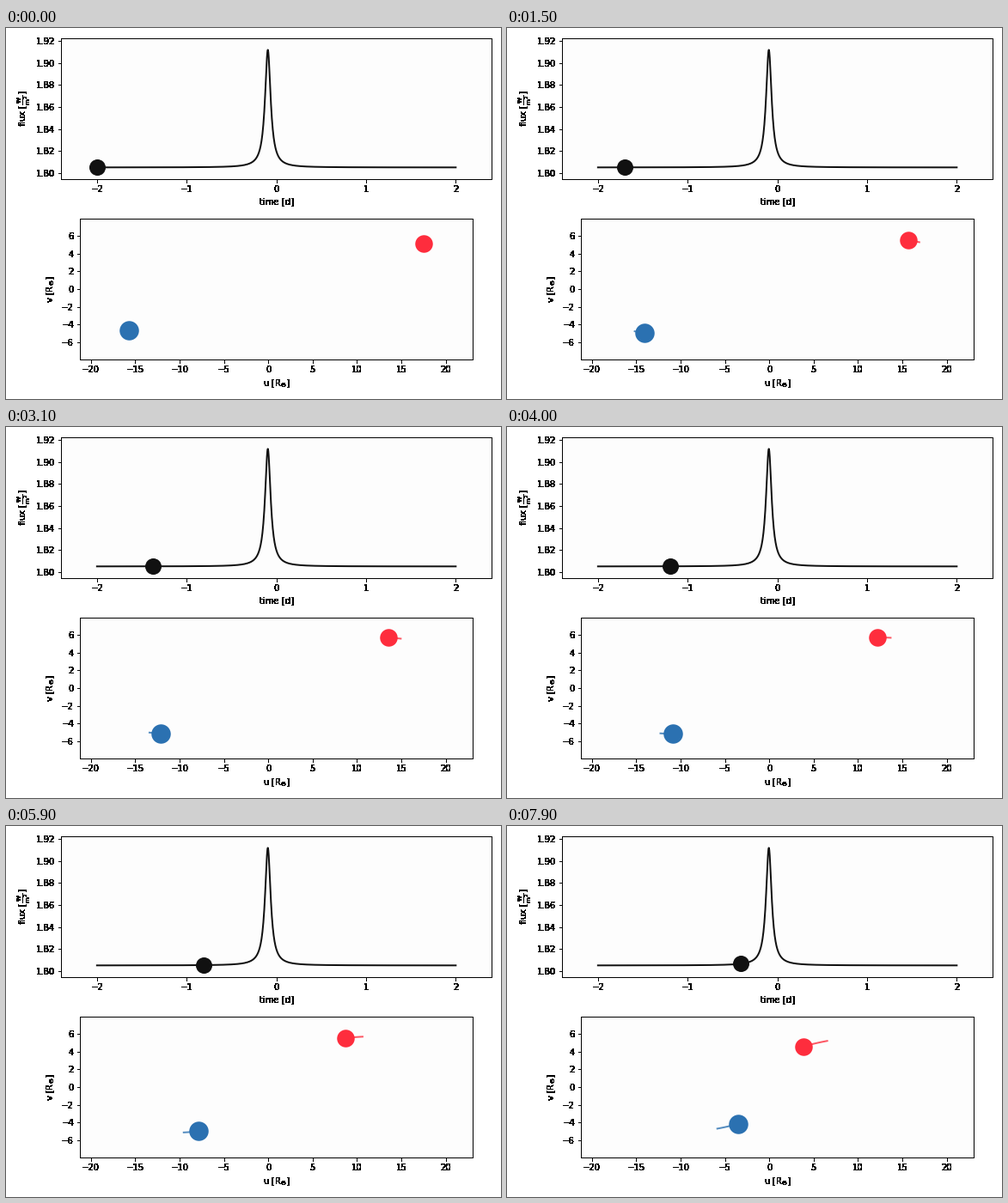
Recreate the animation shown at these times as a matplotlib script. Size 576 px wide and 432 px high, loop 8000 ms.

```python
import numpy as np
import matplotlib.pyplot as plt
from matplotlib.animation import FuncAnimation

W, H, DPI = 576, 432, 72
FRAMES, INTERVAL = 80, 100
STEP = 4 / 199              # days per frame
TRAIL = 0.2                 # trail length in days
PEAK = -0.095               # time of closest approach
BLACK, BLUE, RED = "#111111", "#2b71b1", "#fe2d3d"
RATIO = -0.897              # primary orbit relative to the secondary

plt.rcParams.update({"font.family": "DejaVu Sans", "font.size": 10})


def harden(img, dpi):
    """Make every partly covered pixel solid black."""
    out = np.zeros_like(img)
    out[..., 3] = img[..., 3] > 0.04
    return out, 0, 0


def panel(left, top, right, bottom, xlim, ylim, xticks, yticks, labels, pad):
    ax = fig.add_axes([left / W, 1 - bottom / H, (right - left) / W, (bottom - top) / H])
    ax.set(xlim=xlim, ylim=ylim, xticks=xticks, yticks=yticks,
           xlabel=labels[0], facecolor="#fdfdfd")
    ax.set_ylabel(labels[1], labelpad=pad)
    for part in (ax.xaxis, ax.yaxis, *ax.spines.values()):
        part.set_agg_filter(harden)
    return ax


def dot(ax, color, size):
    return ax.plot([], [], "o", color=color, ms=size, mew=0, zorder=4)[0]


def trail(ax, color):
    return ax.plot([], [], color=color, lw=2, alpha=0.8, zorder=3)[0]


def flux(t):
    return 1.8052 + 0.1067 / (1 + ((t - PEAK) / 0.038) ** 2)


def orbit(t):
    """Infall of the secondary, smooth in the root of the time left."""
    w = np.sqrt((PEAK - t) / STEP * INTERVAL / 1000)
    d = w - 1.85
    return 8.42 + 7.68 * d - 0.2 * d ** 3, 5.73 - 0.97 * (w - 2.33) ** 2


fig = plt.figure(figsize=(W / DPI, H / DPI), dpi=DPI, facecolor="white")
light = panel(64.1, 12.1, 565.1, 176.1, (-2.4, 2.4), (1.7945, 1.9223),
              range(-2, 3), np.arange(1.80, 1.925, 0.02),
              ("time [d]", r"flux [$\mathrm{\frac{W}{m^{2}}}$]"), 4)
light.yaxis.set_major_formatter("{x:.2f}")
sky = panel(86.1, 222.1, 543.1, 386.1, (-21.23, 23.05), (-7.946, 7.946),
            range(-20, 21, 5), range(-6, 7, 2),
            (r"u [$\mathrm{R_{\odot}}$]", r"v [$\mathrm{R_{\odot}}$]"), 5)

times = np.linspace(-2, 2, 801)
light.plot(times, flux(times), color=BLACK, lw=2)
now = dot(light, BLACK, 19)
stars = [(1, trail(sky, RED), dot(sky, RED, 20.5)),
         (RATIO, trail(sky, BLUE), dot(sky, BLUE, 22.5))]


def update(i):
    t = -2 + i * STEP
    now.set_data([t], [flux(t)])
    u, v = orbit(np.linspace(max(-2, t - TRAIL), t, 20))
    for scale, path, star in stars:
        path.set_data(scale * u, scale * v)
        star.set_data([scale * u[-1]], [scale * v[-1]])
    return ()


anim = FuncAnimation(fig, update, frames=FRAMES, interval=INTERVAL,
                     init_func=lambda: (), repeat=True, repeat_delay=0)
plt.show()
```
